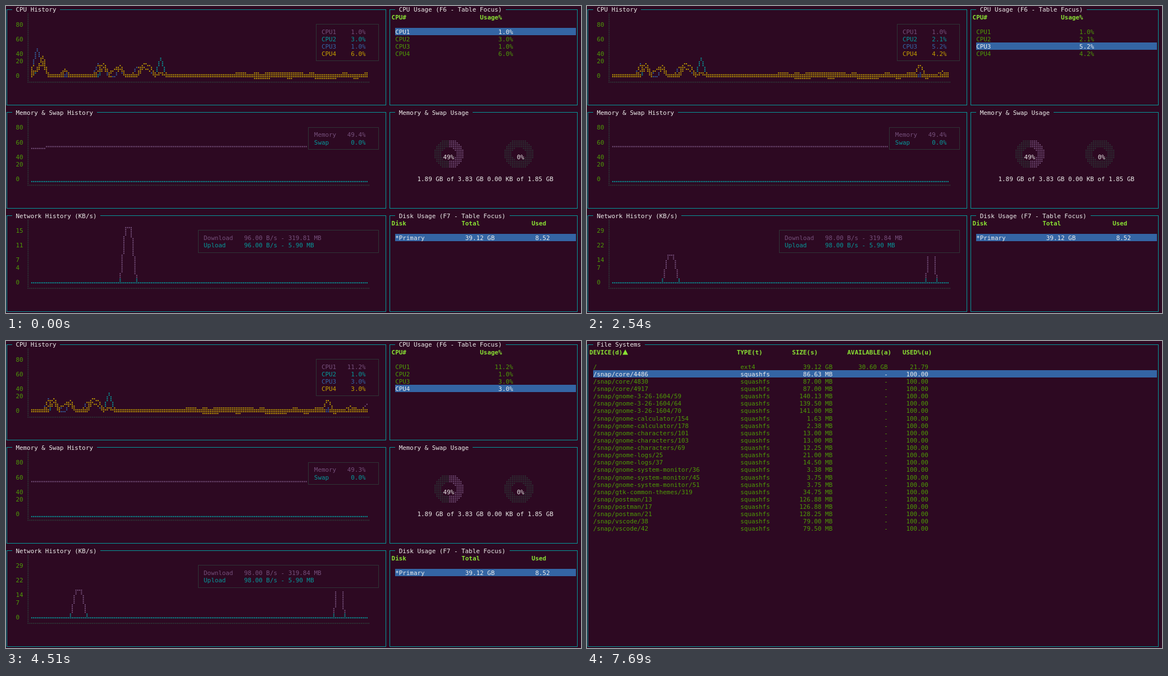
Write an HTML page with a canvas that moves like this. It is 1024 px wide and 547 px high and loops after 8 s.

```html
<!DOCTYPE html>
<html lang="en">
<head>
<meta charset="utf-8">
<title>Terminal system monitor</title>
<style>
  html, body { margin: 0; height: 100%; overflow: hidden; background: #2d0922; }
  canvas { display: block; }
</style>
</head>
<body>
<canvas id="screen" width="1024" height="547"></canvas>
<script>
const ctx = document.getElementById('screen').getContext('2d');
const CW = 6.56, CH = 13.12, LOOP = 8000;
const BG = '#2d0922', WHITE = '#eeeeec', GREEN = '#4e9a06', LIME = '#8ae234', DIM = '#2e3436',
  CYAN = '#06989a', BLUE = '#3465a4', MAGENTA = '#75507b', YELLOW = '#c4a000';
const CPU_COLORS = [MAGENTA, CYAN, BLUE, YELLOW];

// Terminal cell to pixel
const px = col => col * CW - 2.2;
const py = row => row * CH - 0.4;

function text(str, col, row, color = GREEN, bold = false) {
  ctx.font = `${bold ? 'bold ' : ''}${CW / 0.602}px "DejaVu Sans Mono", monospace`;
  ctx.fillStyle = color;
  ctx.fillText(str, px(col), py(row) + 10.8);
}
const textRight = (str, endCol, row, color) => text(str, endCol - str.length, row, color);

function fillCells(col, row, endCol, endRow, color) {
  const x = Math.round(px(col)), y = Math.round(py(row));
  ctx.fillStyle = color;
  ctx.fillRect(x, y, Math.round(px(endCol)) - x, Math.round(py(endRow)) - y);
}

function frame(c0, r0, c1, r1, color) {
  ctx.strokeStyle = color;
  ctx.lineWidth = 1;
  const snap = v => Math.floor(v) + 0.5;
  const x = snap(px(c0 + 0.5)), y = snap(py(r0 + 0.5));
  ctx.strokeRect(x, y, snap(px(c1 + 0.5)) - x, snap(py(r1 + 0.5)) - y);
}

function panel(c0, r0, c1, r1, title) {
  frame(c0, r0, c1, r1, CYAN);
  fillCells(c0 + 2, r0, c0 + 4 + title.length, r0 + 1, BG);
  text(title, c0 + 3, r0, WHITE);
}

// Braille dots: two per column, four per row
function dot(x, y, color) {
  ctx.fillStyle = color;
  ctx.fillRect(px(x / 2 + 0.33) - 1, py((y + 0.5) / 4) - 1, 2, 2);
}

function drawDots(row, seriesList) {
  const dots = new Map(), cellColor = {};
  const cell = (x, y) => (x >> 1) + ',' + (y >> 2);
  const plot = (x, y, color) => {
    dots.set(x + ',' + y, [x, y]);
    cellColor[cell(x, y)] = color; // a cell has one colour: the last one
  };
  for (const [values, color] of seriesList) {
    for (let i = 0; i < 60; i++) {
      let x = Math.floor(i * 3.05), y = values[i];
      const x1 = Math.min(182, Math.floor((i + 1) * 3.05)), y1 = values[i + 1];
      const dx = x1 - x, dy = Math.abs(y1 - y), step = Math.sign(y1 - y);
      for (let err = dx - dy; ;) {
        plot(x, y, color);
        if (x === x1 && y === y1) break;
        const e2 = 2 * err;
        if (e2 > -dy) { err -= dy; x++; }
        if (e2 < dx) { err += dx; y += step; }
      }
    }
  }
  for (const [x, y] of dots.values()) dot(x + 14, y + row * 4, cellColor[cell(x, y)]);
}

function chart(row, labels, seriesList) {
  for (let y = 4; y < 42; y++) dot(12, row * 4 + y, DIM);
  for (let x = 13; x < 198; x++) dot(x, row * 4 + 41, DIM);
  [2, 4, 6, 7, 9].forEach((r, i) => text(String(labels[i]), 3, row + r));
  drawDots(row, seriesList);
}

function legend(col, row, lines, colors) {
  fillCells(col, row, 102, row + lines.length + 2, BG);
  frame(col, row, 101, row + lines.length + 1, DIM);
  lines.forEach((line, i) => text(line, col + 2, row + 1 + i, colors[i]));
}

function donut(centerCol, percent) {
  const cx = centerCol * 2 - 0.5, cy = 80;
  for (let y = -7; y < 8; y++) for (let x = -7.5; x < 8; x++) {
    const r = Math.hypot(x, y), turn = (Math.atan2(x, -y) / (2 * Math.PI) + 1) % 1;
    if (r > 3.8 && r < 7.9) dot(cx + x, cy + y, turn < percent / 100 ? MAGENTA : DIM);
  }
}

// Sampled history: quiet noise, bursts shared by all cores, and bursts of one core
const noise = (c, i) => {
  const v = Math.sin(i * 12.9898 + c * 78.233) * 43758.5453;
  return v - Math.floor(v);
};
const shared = { 1: 9, 2: 20, 13: 13, 16: 12, 20: 13, 21: 10, 23: 7 };
const bursts = [
  {},
  { 15: 12, 23: 28 },
  { 0: 8, 1: 39, 6: 10, 12: 20, 19: 14, 62: 7 },
  { 0: 6, 1: 12, 2: 30, 6: 12, 12: 10, 13: 20, 14: 6, 15: 11, 16: 18, 17: 5,
    20: 19, 21: 17, 22: 5, 37: 6, 38: 6, 62: 19 },
];
const states = [
  { shift: 0, cpu: [1, 3, 1, 6], rate: 96, total: '319.81', mem: 49.4 },
  { shift: 5, cpu: [1, 2, 1, 3], rate: 97, total: '319.84', mem: 49.4 },
  { shift: 6, cpu: [1, 3, 2, 9], rate: 97, total: '319.84', mem: 49.4 },
  { shift: 7, cpu: [1, 2.1, 5.2, 4.2], rate: 98, total: '319.84', mem: 49.4 },
  { shift: 8, cpu: [2, 1, 2, 3], rate: 97, total: '319.84', mem: 49.4 },
  { shift: 9, cpu: [11.2, 1, 3, 3], rate: 98, total: '319.84', mem: 49.3 },
  { shift: 10, cpu: [1, 1, 1, 6.1], rate: 97, total: '319.84', mem: 49.3 },
];

function cpuLoad(c, i) {
  const shown = states.find(s => s.shift + 60 === i);
  if (shown) return shown.cpu[c];
  const burst = bursts[c][i] ?? shared[i];
  if (burst) return burst;
  const busy = i >= 40, n = noise(c, i);
  return [1, 3, busy && n < 0.45 ? 0 : 1, busy && n < 0.45 ? 6 : 3][c];
}
const download = i => i === 17 || i === 18 ? 1 : i === 64 ? 2 : 0;
const series = (shift, fn) => Array.from({ length: 61 }, (_, i) => fn(i + shift));

const lastIndex = (times, t) => times.filter(v => v <= t).length - 1;
const cpuTimes = [0, 1070, 1550, 2540, 3540, 4450, 5450];
const restTimes = [0, 1160, 1610, 2540, 3600, 4510, 5530];
const selectTimes = [0, 1070, 1770, 2690, 3140, 3540];
const selections = [0, 1, 2, 1, 2, 3];
const pct = v => v.toFixed(1) + '%';

function drawCpu(t) {
  const { shift, cpu } = states[lastIndex(cpuTimes, t)];
  const selected = selections[lastIndex(selectTimes, t)];
  panel(0, 0, 103, 13, 'CPU History');
  chart(0, [80, 60, 40, 20, 0], CPU_COLORS.map((color, c) =>
    [series(shift, i => Math.floor(39 - 0.385 * cpuLoad(c, i))), color]));
  legend(84, 2, cpu.map((v, c) => `CPU${c + 1}` + pct(v).padStart(8)), CPU_COLORS);

  panel(104, 0, 155, 13, 'CPU Usage (F6 - Table Focus)');
  text('CPU#', 105, 1, LIME, true);
  text('Usage%', 129, 1, LIME, true);
  cpu.forEach((v, c) => {
    const on = c === selected;
    if (on) fillCells(106, 3 + c, 155, 4 + c, BLUE);
    text(`CPU${c + 1}`, 106, 3 + c, on ? WHITE : GREEN);
    textRight(pct(v), 138, 3 + c, on ? WHITE : GREEN);
  });
}

function drawMemory({ shift, mem }) {
  panel(0, 14, 103, 27, 'Memory & Swap History');
  chart(14, [80, 60, 40, 20, 0], [
    [series(shift, i => i < 3 ? 21 : 20), MAGENTA],
    [series(shift, () => 39), CYAN]]);
  legend(82, 16, ['Memory' + pct(mem).padStart(8), 'Swap' + '0.0%'.padStart(10)], [MAGENTA, CYAN]);

  panel(104, 14, 155, 27, 'Memory & Swap Usage');
  donut(120.5, 49);
  donut(139.5, 0);
  fillCells(119, 20, 122, 21, BG);
  text('49%', 119, 20, WHITE);
  text('0%', 139, 20, WHITE);
  text('1.89 GB of 3.83 GB 0.00 KB of 1.85 GB', 112, 23, WHITE);
}

function drawNetwork({ shift, rate, total }) {
  const max = shift ? 2 : 1;
  panel(0, 28, 103, 41, 'Network History (KB/s)');
  chart(28, shift ? [29, 22, 14, 7, 0] : [15, 11, 7, 4, 0], [
    [series(shift, i => 38 - 30 * download(i) / max), MAGENTA],
    [series(shift, () => 38), CYAN]]);
  const speed = rate.toFixed(2) + ' B/s - ';
  legend(52, 30, [`Download   ${speed}${total} MB`, `Upload     ${speed}5.90 MB`], [MAGENTA, CYAN]);

  panel(104, 28, 155, 41, 'Disk Usage (F7 - Table Focus)');
  text('Disk', 105, 29, LIME, true);
  text('Total', 124, 29, LIME, true);
  text('Used', 143, 29, LIME, true);
  fillCells(106, 31, 155, 32, BLUE);
  text('*Primary', 106, 31, WHITE);
  text('39.12 GB', 125, 31, WHITE);
  text('8.52', 144, 31, WHITE);
}

const mounts = `core/4486 86.63|core/4830 87.00|core/4917 87.00|gnome-3-26-1604/59 140.13
gnome-3-26-1604/64 139.50|gnome-3-26-1604/70 141.00|gnome-calculator/154 1.63
gnome-calculator/178 2.38|gnome-characters/101 13.00|gnome-characters/103 13.00
gnome-characters/69 12.25|gnome-logs/25 21.00|gnome-logs/37 14.50|gnome-system-monitor/36 3.38
gnome-system-monitor/45 3.75|gnome-system-monitor/51 3.75|gtk-common-themes/319 34.75
postman/13 126.88|postman/17 126.88|postman/21 128.25|vscode/38 79.00|vscode/42 79.50`
  .split(/[|\n]/).map(line => {
    const [name, size] = line.split(' ');
    return ['/snap/' + name, 'squashfs', size + ' MB', '-', '100.00'];
  });
mounts.unshift(['/', 'ext4', '39.12 GB', '30.60 GB', '21.79']);

function drawFileSystems(selected) {
  panel(0, 0, 155, 41, 'File Systems');
  [['DEVICE(d)', 1], ['TYPE(t)', 41], ['SIZE(s)', 56], ['AVAILABLE(a)', 71], ['USED%(u)', 86]]
    .forEach(([label, col]) => text(label, col, 1, LIME, true));
  ctx.fillStyle = LIME;
  ctx.fill(new Path2D('M63.3 24.5L68.2 15L73.1 24.5Z'));
  mounts.forEach(([device, type, size, available, used], i) => {
    const row = 3 + i, color = i === selected ? WHITE : GREEN;
    if (i === selected) fillCells(2, row, 155, row + 1, BLUE);
    text(device, 2, row, color);
    text(type, 42, row, color);
    textRight(size, 67, row, color);
    textRight(available, 82, row, color);
    textRight(used, 93, row, color);
  });
}

function draw(now) {
  const t = now % LOOP;
  ctx.fillStyle = BG;
  ctx.fillRect(0, 0, 1024, 547);
  if (t >= 6060) {
    drawFileSystems(t >= 7690 ? 1 : 0);
  } else {
    const rest = states[lastIndex(restTimes, t)];
    drawCpu(t);
    drawMemory(rest);
    drawNetwork(rest);
  }
  requestAnimationFrame(draw);
}
requestAnimationFrame(draw);
</script>
</body>
</html>
```
